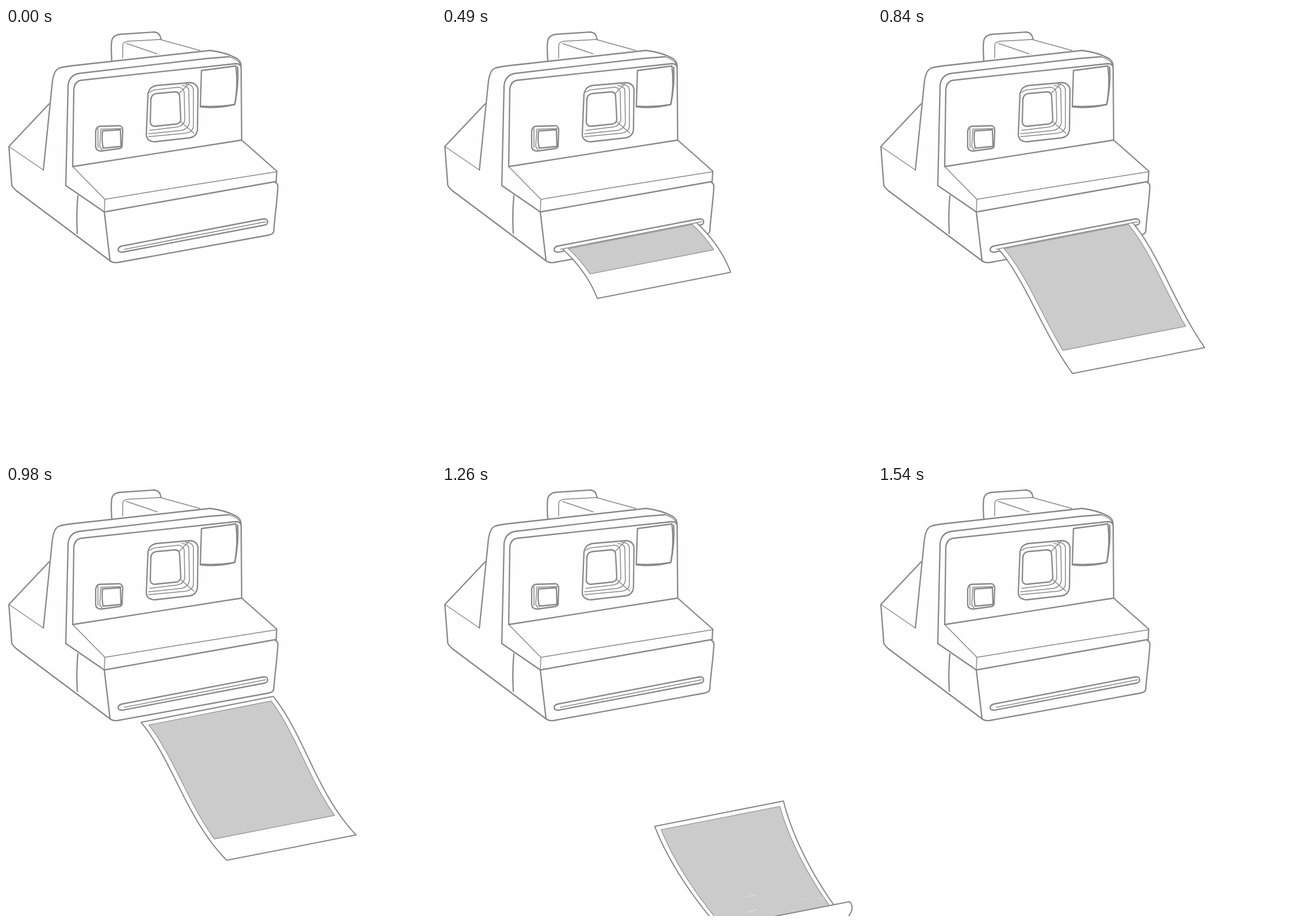
Animation, 748 px wide and 748 px high, one loop 1680 ms. Source, as an HTML page:

```html
<!DOCTYPE html>
<html lang="en">
<head>
<meta charset="utf-8">
<title>Instant camera</title>
<style>
  html, body { margin: 0; height: 100%; overflow: hidden; background: #fefefe; }
  svg { display: block; width: 100vw; height: 100vh; }
  path { fill: none; stroke: #888; stroke-width: 2.3; stroke-linecap: round; stroke-linejoin: round; }
  .thin path { stroke-width: 1.5; }
  #sheet, #curl path { fill: #fefefe; stroke-width: 2; }
  #picture { fill: #cbcbcb; stroke: #999; stroke-width: 1.4; }
  #curl .glint { stroke: #e2e2e2; stroke-width: 1; fill: none; }
</style>
</head>
<body>
<svg viewBox="0 0 748 748">
  <g id="body">
    <path d="M184 58C183 40 182 22 186 17Q190 12 198 11L258 7Q266 8 268 14L270 20"/>
    <path d="M65 247L80 100Q82 74 92 70Q100 67 130 64L355 39Q380 42 400 52Q409 57 409 67L410 195"/>
    <path d="M104 274L108 100Q110 82 127 79L350 53L388 50"/>
    <path d="M116 241L118 105Q120 93 130 91L400 62Q407 62 409 68"/>
    <path d="M75 132L5 206L10 273Q11 277 18 283L181 405Q186 409 194 408L458 360Q466 358 466 352C467 330 472 300 473 274Q472 270 468 268"/>
    <path d="M116 241L410 195L471 249L470 267L171 320L104 274M171 320L181 405"/>
    <path d="M125 292Q122 325 124 357"/>
  </g>
  <g class="thin">
    <path d="M203 52L203 30Q204 24 212 23L268 20L337 39M210 27L263 45"/>
    <path d="M5 206L65 247M116 241L172 298L171 320M172 298L300 277L471 250"/>
    <path d="M388 50Q404 54 409 66"/>
  </g>
  <g id="flash">
    <path d="M340 74L400 66Q404 100 398 133Q370 138 338 136Z"/>
    <path d="M403 68Q405 100 398 133Q370 141 338 137"/>
  </g>
  <g id="lens">
    <path d="M262 100L320 95Q333 96 334 108L333 178Q331 189 320 191L258 198Q245 197 244 186L247 115Q249 102 262 100Z"/>
    <path d="M262 114L295 111Q302 112 302 119L304 158Q304 165 297 167L258 171Q251 170 251 163L252 124Q253 115 262 114Z"/>
  </g>
  <g class="thin">
    <path d="M250 112Q256 107 264 107L300 103Q309 104 310 112L311 160Q309 170 299 172L250 178"/>
    <path d="M306 100Q317 101 318 108L319 165Q317 175 306 178L248 184"/>
    <path d="M312 98Q325 98 326 108L326 172Q324 181 313 183L248 189"/>
    <path d="M302 113L318 97M304 163L327 183"/>
  </g>
  <g id="button">
    <path d="M163 171L198 170Q203 172 203 177L202 205Q201 210 195 210L166 214Q157 214 156 207L156 180Q157 172 163 171Z"/>
    <path d="M168 179L199 177L200 206L169 209Q166 195 168 179Z"/>
  </g>
  <g class="thin">
    <path d="M201 175L165 176L163 206L167 212M160 175L160 208"/>
  </g>
  <g id="slot">
    <path d="M203 379L448 332Q456 332 455 338Q455 342 449 343L202 390Q195 390 195 385Q196 380 203 379Z"/>
    <path d="M206 385L452 337" stroke-width="1.5" style="stroke-width:1.5"/>
  </g>
  <path id="sheet"/>
  <path id="picture"/>
  <g id="curl">
    <path class="glint" d="M530 714L548 711M528 742L548 737M625 720L640 717M655 718L668 715"/>
    <path d="M480 768L709 723Q720 735 704 752L470 800Z"/>
  </g>
</svg>
<script>
const LOOP = 1680, STEP = 70, LAST = 21;
const FREE = 12, CURLED = 17;                    // poses where the sheet leaves the slot, then curls
const TOP = 8, PICTURE = 233, BOTTOM = 46, SIDE = 0.037, TILT = 0.196;

// pose: right edge as a cubic curve (x, y pairs), then sheet width at its top and bottom
const keys = {
  0: [444, 340, 444, 340, 444, 340, 444, 340, 239, 239],
  3: [444, 340, 454, 349, 464, 358, 474, 367, 239, 239],
  6: [444, 340, 470, 364, 492, 396, 502, 425, 233, 232],
  9: [444, 340, 478, 378, 508, 432, 529, 504, 234, 234],
  12: [444, 340, 495, 402, 521, 508, 588, 582, 233, 228],
  13: [465, 366, 520, 435, 540, 535, 609, 607, 230, 225],
  16: [572, 504, 588, 575, 640, 665, 694, 708, 225, 222],
  17: [594, 548, 608, 605, 645, 685, 705, 760, 224, 195],
  20: [656, 688, 670, 745, 707, 825, 767, 900, 224, 195]
};
const poses = Object.keys(keys).map(Number);
const [sheet, picture, curl] = ['sheet', 'picture', 'curl'].map(id => document.getElementById(id));
const rail = document.createElementNS('http://www.w3.org/2000/svg', 'path');
const mix = (a, b, k) => a + (b - a) * k;

function keyAt(pose) {
  const next = poses.find(p => p >= pose);
  const prev = poses.filter(p => p <= pose).pop();
  const k = next > prev ? (pose - prev) / (next - prev) : 0;
  return keys[prev].map((v, i) => mix(v, keys[next][i], k));
}

// Outline of the part of the sheet between two lengths and two side insets
function strip(from, to, inset, length, topWidth, bottomWidth) {
  const side = u => Array.from({ length: 25 }, (_, i) => {
    const s = mix(from, to, i / 24), p = rail.getPointAtLength(s);
    const w = mix(topWidth, bottomWidth, s / length) * u;
    return [p.x - w, p.y + w * TILT];
  });
  return 'M' + [...side(inset), ...side(1 - inset).reverse()].join('L');
}

function draw(pose) {
  const visible = pose > 0 && pose < LAST, curled = visible && pose >= CURLED;
  curl.style.display = curled ? '' : 'none';
  let outline = '', inner = '';
  if (visible) {
    const [x0, y0, x1, y1, x2, y2, x3, y3, ...widths] = keyAt(pose);
    rail.setAttribute('d', `M${x0} ${y0}C${x1} ${y1} ${x2} ${y2} ${x3} ${y3}`);
    const length = rail.getTotalLength();
    const end = length - (curled ? 0 : BOTTOM);
    const start = pose > FREE ? TOP : Math.max(0, end - PICTURE);
    outline = strip(0, length, 0, length, ...widths) + (pose >= FREE ? 'Z' : '');
    if (end > start) inner = strip(start, end, SIDE, length, ...widths) + 'Z';
    curl.setAttribute('transform', `translate(${x0 - 594} ${y0 - 548})`);
  }
  sheet.setAttribute('d', outline);
  picture.setAttribute('d', inner);
}

let shown = -1;
function tick() {
  const step = Math.floor(performance.now() % LOOP / STEP);
  const pose = Math.min(LAST, Math.max(0, step - 1));
  if (pose !== shown) draw(shown = pose);
  requestAnimationFrame(tick);
}
tick();
</script>
</body>
</html>
```
